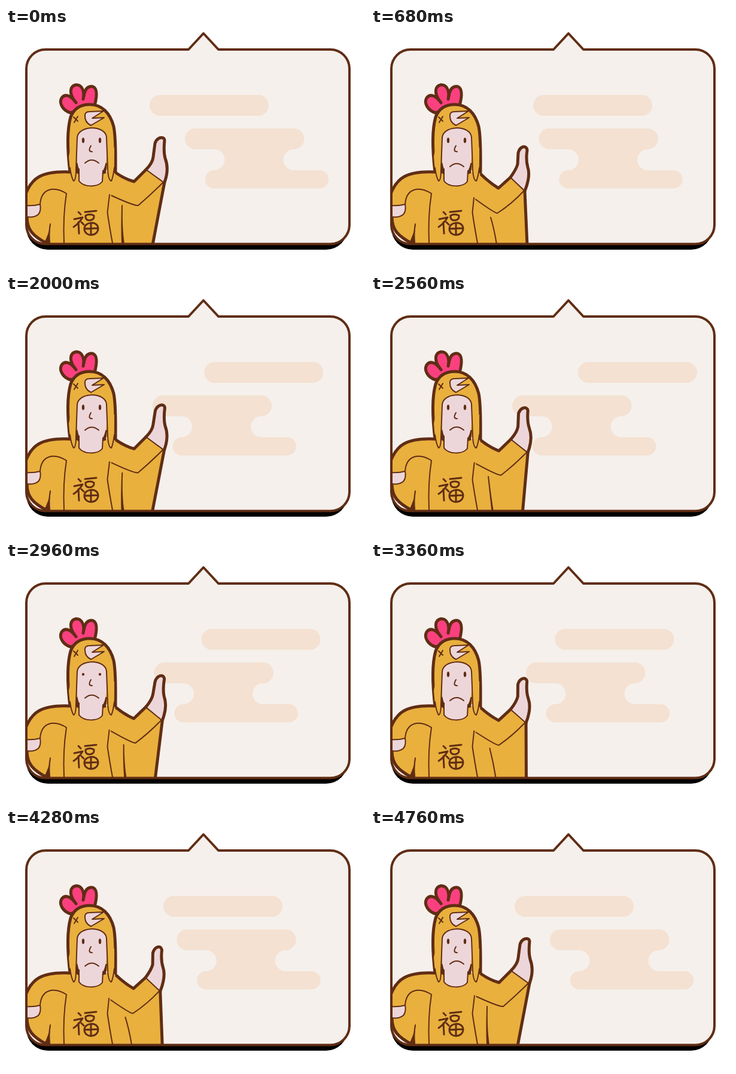
These frames come from a looping animation (600x400 px, 4.8 s). An HTML page:

```html
<!DOCTYPE html>
<html lang="en">
<head>
<meta charset="utf-8">
<title>Chicken suit</title>
<style>
  html, body { margin: 0; width: 100%; height: 100%; overflow: hidden; background: #fff; }
  svg { display: block; width: 600px; height: 400px; }
  .cloud { fill: #f4e1d2; }
  .suit { fill: #e9b03e; }
  .skin { fill: #edd6d9; }
  .comb { fill: #fb4080; }
  .ink { fill: #602d14; }
  .none { fill: none; }
  .thin, .thick, .mark { stroke: #602d14; stroke-linecap: round; stroke-linejoin: round; }
  .thin { stroke-width: 2; }
  .thick { stroke-width: 5; }
  .mark { stroke-width: 3; }
</style>
</head>
<body>
<svg viewBox="0 0 600 400">
  <defs>
    <path id="card" d="M66 36H305L330 9L355 36H542A32 32 0 0 1 574 68V330A32 32 0 0 1 542 361.500H66A32 32 0 0 1 34 330V68A32 32 0 0 1 66 36Z"/>
    <clipPath id="inside"><use href="#card"/></clipPath>
  </defs>
  <rect x="34" y="280" width="537" height="91" rx="36"/>
  <use href="#card" fill="#f5f0ec"/>

  <rect id="bar" class="cloud" x="240" y="112" width="199" height="35" rx="17.5"/>
  <path id="stack" class="cloud" d="M316.500 168H481a17.500 17.500 0 0 1 0 35a17.500 17.500 0 0 0 0 35H524a15.200 15.200 0 0 1 0 30.500H348a15.200 15.200 0 0 1 0 -30.500a17.500 17.500 0 0 0 0 -35H316.500a17.500 17.500 0 0 1 0 -35Z"/>

  <g clip-path="url(#inside)">
    <!-- raised arm and cape -->
    <path id="cape" class="suit"/>
    <path id="edge" class="none thick"/>
    <path id="hand" class="skin thick"/>
    <path id="sleeve" class="suit"/>
    <path id="shoulder" class="none thick"/>
    <path id="cuff" class="none thin"/>
    <path id="fold" class="ink thin"/>

    <!-- body and resting arm -->
    <path class="suit" d="M30 282C40 254 56 240 107 241L183 241L176 279Q168 310 178 361H70C50 352 36 342 35 318Z"/>
    <path class="none thick" d="M32 280C42 252 58 239 106 241M35 316C35 338 45 348 69 361"/>
    <path class="skin thin" d="M34 297Q46 298 57 295Q59 306 54 312Q47 318 34 316Z"/>
    <path class="none thin" d="M57 295C59 268 80 264 101 277Q95 315 97 360M74 328Q71 343 73 360"/>
    <path class="ink" d="M75 328Q71 346 63 361H74Q72 345 75 328Z"/>
    <path id="side" class="none thin"/>

    <!-- lettering on the chest -->
    <path class="none mark" d="M121 308L125 312M114 320L128 317Q122 327 113 333M121 325L122 344M126 325L130 329M119 309M132 308L151 306M133 314Q140 310 147 314Q148 321 140 322Q132 322 133 314ZM131 336C131 324 153 322 154 335C154 350 131 350 131 336ZM131 336L154 335M142 326L142 346"/>

    <!-- head -->
    <path class="comb thick" d="M108 142C95 138 88 126 93 117C99 109 108 114 114 121C106 110 106 97 117 95C127 95 130 105 130 114C132 101 138 97 145 98C153 101 152 115 148 130Z"/>
    <path class="none thick" d="M114 121L117 125M130 113L129 119"/>
    <path class="suit" d="M104 236C102 200 102 170 108 149C114 133 127 128 140 128C160 128 174 142 180 165C184 185 183 210 183 238L166 238H120Z"/>
    <path class="none thick" d="M107 241C102 200 102 170 108 149C114 133 127 128 140 128C160 128 174 142 180 165C184 185 183 212 183 241"/>
    <path class="ink" d="M118 226L123 226V246L117 242ZM162 226H169L167 243L161 245Z"/>
    <path class="skin" d="M118 205L119 183C122 162 166 162 168 183L169 205Q168 228 162 239L161 257C153 267 130 267 122 256L122 236Q118 225 118 205Z"/>
    <path class="none thin" d="M162 239L161 257C153 267 130 267 122 256L122 236"/>
    <path class="suit" d="M105 215Q107 248 113 256Q117 255 117 237L118 205L108 200ZM181 215Q181 248 176 256Q171 255 170 237L169 205L181 200Z"/>
    <path class="none thin" d="M107 234Q109 250 113 256Q117 255 117 237L119 183C122 162 166 162 168 183L170 237Q171 255 176 256Q179 250 181 234"/>
    <path class="skin thin" d="M132 145Q133 140 140 140L163 139L144 151L164 150L142 163Q131 158 132 145Z"/>
    <path class="none thin" d="M113 149L120 156M120 148L114 158"/>
    <g class="ink" id="eyes">
      <ellipse cx="129" cy="188" rx="2.2" ry="4.6"/>
      <ellipse cx="157" cy="188" rx="2.2" ry="4.6"/>
    </g>
    <path class="none thin" d="M142 197Q136 207 144 207"/>
    <path id="mouth" class="none thin" d="M132 226Q143 216 155 226"/>
  </g>
  <use href="#card" class="none" stroke="#602d14" stroke-width="4" stroke-linejoin="round"/>
</svg>
<script>
const LOOP = 4800, STEP = 40, SPAN = 4760, TURN = 2440;
const el = id => document.getElementById(id);
const mix = (a, b, k) => a + (b - a) * k;
const move = (id, x, y) => el(id).setAttribute('transform', `translate(${x} ${y})`);
const draw = (id, d) => el(id).setAttribute('d', d);

// [time, value] pairs
const WAVE = [[0, 0], [680, .5], [1440, 1.33], [2560, 2.8], [3360, 3.67], [3800, 4.2], [SPAN, 5]];
const MOUTH = [[0, 0], [320, 0], [680, 6], [1440, 4], [2040, 0], [2800, 0], [3360, 6], [3800, 8], [4640, 0]];

function at(keys, t) {
  const i = keys.findIndex(key => key[0] > t);
  if (i < 0) return keys[keys.length - 1][1];
  const [t0, a] = keys[i - 1], [t1, b] = keys[i];
  return mix(a, b, (t - t0) / (t1 - t0));
}

function drawArm(phase) {
  const a = 2 * Math.PI * phase;
  const k = (1 - Math.cos(a)) / 2;
  const swing = 16 * k - 3 * Math.sin(a);
  const lean = (swing - 14 * k) / 2;
  // point between the raised and the lowered pose
  const p = (x0, y0, x1, y1, dx = 0) =>
    `${mix(x0, x1, k) - dx} ${mix(y0, y1, k)} `;
  const top = p(183, 242, 183, 244);
  const dip = p(214, 257, 213, 268);
  const wrist = p(234, 237, 233, 250);
  const heel = p(265, 258, 257, 273);
  const elbow = p(221, 297, 211, 310);
  const hem = `${245 + swing} 363`;
  const upper = `M${top}Q${p(199, 253, 198, 259)}${dip}L${wrist}`;

  draw('cape', `${upper}L${heel}L${hem}L165 363L170 250Z`);
  draw('edge', `M${heel}L${hem}`);
  draw('hand', `M${wrist}Q${p(245, 226, 243, 236)}${p(246, 216, 245, 228)}` +
    `L${p(249, 193, 247, 209, lean)}C${p(252, 183, 250, 198, lean)}${p(264, 180, 260, 195, lean)}` +
    `${p(265, 188, 262, 204, lean)}Q${p(263, 207, 259, 221, lean / 2)}${p(266, 218, 262, 233)}` +
    `Q${p(273, 236, 267, 248)}${heel}`);
  draw('sleeve', `${upper}L${p(262, 259, 255, 273)}L${elbow}L${p(170, 277, 167, 281)}Z`);
  draw('shoulder', upper);
  draw('cuff', `M${wrist}L${p(263, 258, 256, 272)}Q${p(242, 279, 236, 294)}${elbow}` +
    `Q${p(214, 298, 205, 309)}${p(171, 278, 167, 281)}`);
  draw('side', `M${p(173, 279, 172, 284)}L169.500 309Q173 333 178 360`);

  const foot = 197 + swing * .8;
  const gap = Math.max(0, 3 - swing / 5);
  draw('fold', `M${p(194, 297, 200, 317)}Q${foot - 4} 336 ${foot} 361` +
    `L${foot - gap} 361Q${foot - 4} 336 ${p(194, 297, 200, 317)}Z`);
}

function render(time) {
  const t = Math.floor((time % LOOP) / STEP) * STEP;
  const drift = t < TURN ? t * .0457 : (SPAN - t) * .0481;
  move('bar', drift, 0);
  move('stack', -.594 * drift, 0);
  drawArm(at(WAVE, t));
  move('mouth', 0, at(MOUTH, t));

  const b = t % 1200 - 480;
  const open = b < 0 || b > 80 ? 1 : b === 40 ? .15 : .5;
  el('eyes').setAttribute('transform', `translate(0 ${188 * (1 - open)}) scale(1 ${open})`);
}

const start = performance.now();
function tick() {
  render(performance.now() - start);
  requestAnimationFrame(tick);
}
tick();
</script>
</body>
</html>
```
